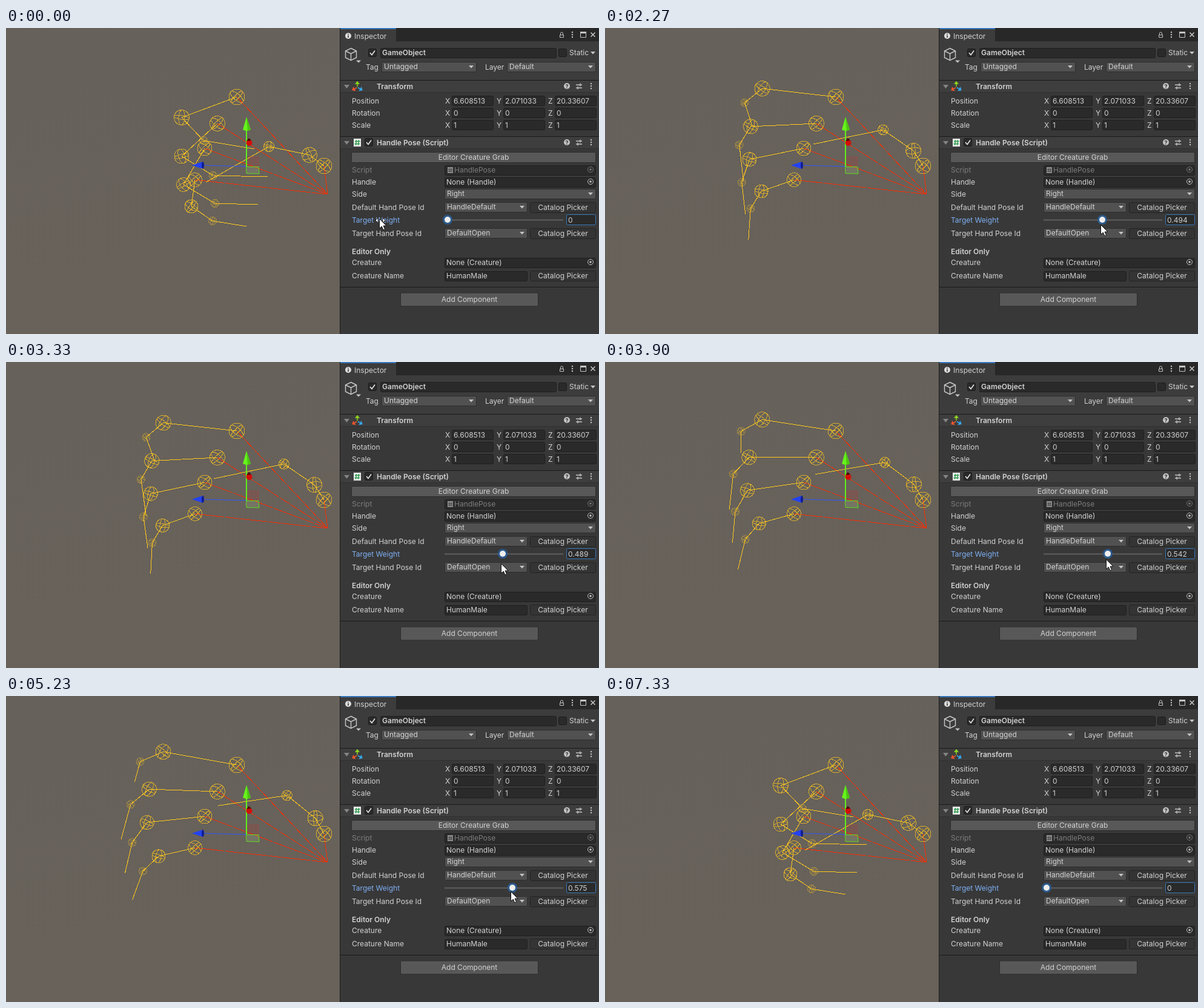
An HTML page that plays this animation: 979x506 px, repeating every 7510 ms.

```html
<!DOCTYPE html>
<html lang="en">
<head>
<meta charset="utf-8">
<title>Hand pose weight</title>
<style>
html, body { margin: 0; width: 100%; height: 100%; overflow: hidden; background: #383838; }
svg { display: block; width: 979px; height: 506px; }
text { font: 12px Inter, "Liberation Sans", sans-serif; fill: #d2d2d2; white-space: pre; }
.bold { font-weight: 600; }
.dim { fill: #7d7d7d; }
.wire { fill: none; stroke: #ffc81e; stroke-width: 1; shape-rendering: crispEdges; }
</style>
</head>
<body>
<svg id="stage" viewBox="0 0 979 506" xmlns="http://www.w3.org/2000/svg">
  <defs>
    <linearGradient id="sky" x2=".25" y2="1">
      <stop stop-color="#66615b"/><stop offset="1" stop-color="#68625a"/>
    </linearGradient>
  </defs>
  <rect width="552" height="506" fill="url(#sky)"/>
  <g class="wire">
    <path id="rays" stroke="#ff2d00" stroke-dasharray="48 2 21 1"/>
    <path id="far" stroke-opacity=".38"/>
    <path id="balls" stroke-opacity=".72"/>
    <path id="bones"/>
  </g>
  <g id="gizmo">
    <rect x="399" y="213" width="18" height="16" fill="#d22" fill-opacity=".14" stroke="#c33" stroke-opacity=".3"/>
    <path d="M396.500 229.500L417 229.500L418 241L397 240.500Z" fill="#8c9a78" fill-opacity=".35" stroke="#5fe01c"/>
    <path d="M397 229L326 227" stroke="#2f55ff"/>
    <path d="M307 227L325 221V233Z" fill="#2342f0"/>
    <ellipse cx="325" cy="227" rx="2" ry="6" fill="#101d90"/>
    <path d="M397 229V168" stroke="#61f01a" stroke-width="2"/>
    <path d="M397 147L391 168Q397 172 404 168Z" fill="#66f21c"/>
    <path d="M397 147L399 170Q402 170 404 168Z" fill="#4cc412"/>
    <circle cx="401.500" cy="190" r="5" fill="#d30f08"/>
    <path d="M397 187L401 182L405 186Z" fill="#4b0805"/>
  </g>
  <g id="panel"></g>
  <path d="M724 317.500H920" stroke="#5e5e5e" stroke-width="2"/>
  <g id="knob"><circle r="8" fill="#2c5a8c"/><circle r="5" fill="#eee"/></g>
  <text id="value" x="928" y="322"></text>
  <g id="cursor">
    <path id="drag" d="M-6 3l4 -4v8zM10 3l-4 -4v8z" fill="#fff" stroke="#111" stroke-width=".8"/>
    <path d="M.5 .5V16.500L4.300 13L6.900 18.800L9.500 17.700L7 12H12Z" fill="#fff" stroke="#111"/>
  </g>
</svg>
<script>
const $ = id => document.getElementById(id);

// ---- Inspector panel ----
const LEFT = 571, FIELD = 724, FULL = 250, SHORT = 137;
const out = [];
const add = s => out.push(s);
const text = (x, y, s, attr = '') => add(`<text x="${x}" y="${y}" ${attr}>${s}</text>`);
const fill = (x, y, w, h, c) => add(`<rect x="${x}" y="${y}" width="${w}" height="${h}" fill="${c}"/>`);
const line = (d, c = '#c4c4c4', w = 1) => add(`<path d="${d}" fill="none" stroke="${c}" stroke-width="${w}"/>`);
const shape = (d, c = '#c4c4c4') => add(`<path d="${d}" fill="${c}"/>`);
const ring = (x, y, r, c = '#c4c4c4') => add(`<circle cx="${x}" cy="${y}" r="${r}" fill="none" stroke="${c}"/>`);
const dot = (x, y, r, c = '#c4c4c4') => add(`<circle cx="${x}" cy="${y}" r="${r}" fill="${c}"/>`);
const box = (x, y, w, h, bg, edge) =>
  add(`<rect x="${x + .5}" y="${y + .5}" width="${w - 1}" height="${h - 1}" rx="2" fill="${bg}" stroke="${edge}"/>`);
const caret = (x, y) => shape(`M${x - 4} ${y - 2}h8l-4 4.500z`);
const dots = (x, y) => [-4, 0, 4].forEach(d => dot(x, y + d, 1.2));
const label = (cy, s, attr) => text(LEFT, cy + 4, s, attr);

function field(x, cy, w, s = '', attr = '', pad = 3) {
  box(x, cy - 8, w, 17, '#2a2a2a', '#1f1f1f');
  text(x + pad, cy + 4, s, attr);
}
function button(x, cy, w, s, h = 18, bg = '#585858', edge = '#2c2c2c') {
  box(x, cy - h / 2, w, h, bg, edge);
  text(x + w / 2, cy + 4, s, 'text-anchor="middle"');
}
const picker = cy => button(865, cy, 109, 'Catalog Picker', 18, '#343434', '#242424');
function dropdown(x, cy, w, s) {
  box(x, cy - 8, w, 17, '#515151', '#2e2e2e');
  text(x + 4, cy + 4, s);
  caret(x + w - 9, cy);
}
function check(x, y, on) {
  box(x, y, 14, 14, '#2a2a2a', '#1b1b1b');
  if (on) line(`M${x + 3} ${y + 7}l3 3.500l5 -7`, '#e6e6e6', 1.6);
}
function target(cy, c) {
  ring(965, cy, 4.5, c);
  dot(965, cy, 1.8, c);
}
function header(y, s) {
  fill(552, y, 427, 20, '#3e3e3e');
  fill(552, y - 1, 427, 1, '#1a1a1a');
  fill(552, y + 19, 427, 1, '#303030');
  shape(`M558 ${y + 7}h9l-4.500 6z`, '#858585');
  text(612, y + 14, s, 'class="bold"');
  dot(926, y + 9, 5);
  text(926, y + 12.5, '?', 'text-anchor="middle" style="font-size:9px;font-weight:700;fill:#333"');
  line(`M941 ${y + 7}h10M941 ${y + 12}h10M948 ${y + 4.5}v5M944 ${y + 9.5}v5`, '#c4c4c4', 1.3);
  dots(966, y + 9);
}

// Tab bar
fill(551, 0, 428, 506, '#383838');
fill(551, 0, 428, 22, '#282828');
fill(552, 0, 92, 22, '#3c3c3c');
fill(552, 0, 92, 2, '#3a79bb');
fill(552, 22, 427, 64, '#3c3c3c');
fill(551, 0, 1, 506, '#1d1d1d');
dot(565, 13, 5, '#ddd');
line('M565 9.500v1.500M565 12v4', '#333', 1.5);
text(575, 18, 'Inspector');
line('M914.500 11.500h6v4h-6zM915.500 11V9a2 2 0 0 1 4 0V11');
dots(935, 11);
line('M948.500 7v8.500h9V7');
fill(948, 6, 10, 3, '#c4c4c4');
line('M965.500 7.500l7 7M972.500 7.500l-7 7', '#c4c4c4', 1.6);

// Object
line('M569.500 33.500l9 4.500v11l-9 4.500l-9 -4.500v-11zM560.500 38l9 4.500l9 -4.500M569.500 42.500v11', '#c9c9c9', 1.4);
shape('M578 53.500h8l-4 4z');
check(598, 34, true);
field(618, 41, 291, 'GameObject', 'class="bold"');
check(912, 34, false);
text(930, 45, 'Static');
caret(969, 41);
text(594, 69, 'Tag');
dropdown(620, 64, 157, 'Untagged');
text(791, 69, 'Layer');
dropdown(827, 64, 147, 'Default');

// Transform
header(87, 'Transform');
['#8fd61f', '#35a9f0', '#f0562d'].forEach((c, i) =>
  add(`<path d="M580 97v-5h-2.500l2.500 -3l2.500 3h-2.500" transform="rotate(${i * 120} 580 98)" fill="${c}" stroke="${c}" stroke-width="1.500"/>`));
[
  ['Position', '6.608513', '2.071033', '20.33607'],
  ['Rotation', 0, 0, 0],
  ['Scale', 1, 1, 1]
].forEach(([name, ...v], row) => {
  const cy = 120 + row * 20;
  text(LEFT, cy + 5, name);
  v.forEach((s, i) => {
    text(725 + i * 85, cy + 5, 'XYZ'[i]);
    field(736 + i * 85, cy, 69);
    text(739 + i * 85, cy + 5, s);
  });
});

// Script
header(180, 'Handle Pose (Script)');
fill(574, 183, 12, 13, '#eee');
line('M578.500 185l-1 9M582.500 185l-1 9M576 187.500h8.500M575.500 191.500h8.500', '#2d9a4b', 1.4);
check(592, 182, true);
button(570, 214, 404, 'Editor Creature Grab');
label(235, 'Script', 'class="dim"');
field(FIELD, 235, FULL, 'HandlePose', 'class="dim"', 16);
fill(729, 230, 9, 10, '#8a8a8a');
line('M732 232v6M735 232v6M730 234h7M730 237h7', '#444');
target(234, '#777');
label(255, 'Handle');
field(FIELD, 255, FULL, 'None (Handle)');
target(254);
label(275, 'Side');
dropdown(FIELD, 274, FULL, 'Right');
label(297, 'Default Hand Pose Id');
dropdown(FIELD, 296, SHORT, 'HandleDefault');
picker(297);
label(318, 'Target Weight', 'style="fill:#7fb0f5"');
box(925, 308, 49, 18, '#2a2a2a', '#3a79bb');
label(340, 'Target Hand Pose Id');
dropdown(FIELD, 339, SHORT, 'DefaultOpen');
picker(340);
label(370, 'Editor Only', 'class="bold"');
label(388, 'Creature');
field(FIELD, 388, FULL, 'None (Creature)');
target(387);
label(410, 'Creature Name');
field(FIELD, 410, SHORT, 'HumanMale');
picker(410);
fill(552, 428, 427, 1, '#1a1a1a');
button(651, 449, 228, 'Add Component', 23);
$('panel').innerHTML = out.join('');

// ---- Hand: each bone turns in space from a closed to an open direction ----
const OPEN_AT = .752, WRIST = [531, 275];
const TURN = [1, 1.9, 2.35], THUMB_TURN = [.4, .5, .8];
const fingers = [
  { base: [381, 114], closed: [[-91, 34], [36, 38], [84, 14]], open: [[-117, -38], [-52, -1], [-52, 17]] },
  { base: [349, 158], closed: [[-59, 54], [52, 32], [90, 2]], open: [[-117, -23], [-52, 10], [-60, 41]] },
  { base: [328, 199], closed: [[-35, 60], [52, 31], [71, 2]], open: [[-104, -8], [-46, 18], [-47, 36]] },
  { base: [312, 251], closed: [[-6, 44], [35, 24], [56, 9]], open: [[-71, 2], [-40, 13], [-43, 30]] },
  { base: [525, 228], closed: [[-24, -18], [-67, -14], [-104, 59]], open: [[-11, -28], [-39, -44], [-109, 2]], thumb: true }
];

// Spherical blend of two directions that lie `turn` radians apart
function swing(a, b, turn, u) {
  const p = Math.sin(turn * (1 - u)) / Math.sin(turn), q = Math.sin(turn * u) / Math.sin(turn);
  return [a[0] * p + b[0] * q, a[1] * p + b[1] * q];
}
function joints({ base, closed, open, thumb }, w) {
  const pts = [base];
  closed.forEach((c, i) => {
    const [dx, dy] = swing(c, open[i], (thumb ? THUMB_TURN : TURN)[i], w / OPEN_AT);
    pts.push([pts[i][0] + dx, pts[i][1] + dy]);
  });
  return pts;
}
function ellipse([x, y], rx, ry, deg) {
  const a = deg * Math.PI / 180, dx = rx * Math.cos(a), dy = rx * Math.sin(a);
  const f = n => n.toFixed(1);
  const arc = `A${f(rx)} ${f(ry)} ${f(deg)} 1 1 `;
  return `M${f(x - dx)} ${f(y - dy)}${arc}${f(x + dx)} ${f(y + dy)}${arc}${f(x - dx)} ${f(y - dy)}`;
}
const ball = (p, r, deg) =>
  ellipse(p, r, r, 0) + ellipse(p, r, r * .25, deg) + ellipse(p, r, r * .4, deg + 85);
const angle = (a, b) => Math.atan2(b[1] - a[1], b[0] - a[0]) * 180 / Math.PI;

$('rays').setAttribute('d', fingers.map(f => `M${f.base}L${WRIST}`).join(''));

function drawHand(w) {
  let bones = '', balls = '', far = '';
  fingers.forEach((finger, i) => {
    const [base, a, b, c] = joints(finger, w);
    const r = finger.thumb ? 13 : 13 - i / 2;
    bones += `M${base}L${a}L${b}L${c}`;
    balls += ball(base, r, -45) + ball(a, r - .5, angle(base, a) + 30);
    if (finger.thumb) {
      balls += ball(b, 8.5, angle(a, b));
      if (w > .6) far += ball(c, 6, angle(b, c));
    } else far += ball(b, 6.5, angle(a, b));
  });
  $('bones').setAttribute('d', bones);
  $('balls').setAttribute('d', balls);
  $('far').setAttribute('d', far);
}

// ---- Timeline: eased tracks of [time, value] ----
const LOOP = 7510, STEP = .00537, KNOB_X = 729;
const weight = [[1290, 0], [1430, .02], [1570, .02], [2870, .87], [3130, .87], [3480, .242], [3700, .36],
  [4230, .93], [4400, .93], [4620, .19], [5130, .5], [5550, 1], [6366, 0]];
const reach = [[670, -110], [1330, 3], [2270, 0], [6300, 0], [6630, -36], [6700, -36], [6800, -20]];
const height = [[670, 315], [1330, 318], [3330, 333], [4470, 320], [6630, 330], [6700, 330], [6800, 422]];

function track(keys, t) {
  const i = keys.findIndex(k => k[0] > t);
  if (i < 1) return keys[i < 0 ? keys.length - 1 : 0][1];
  const [t0, a] = keys[i - 1], [t1, b] = keys[i];
  const u = (t - t0) / (t1 - t0);
  return a + (b - a) * u * u * (3 - 2 * u);
}

function frame() {
  const t = performance.now() % LOOP;
  const n = Math.round(track(weight, t) / STEP), w = Math.min(1, n * STEP);
  const x = Math.round(KNOB_X - 3 + n + track(reach, t)), y = Math.round(track(height, t));
  drawHand(w);
  $('knob').setAttribute('transform', `translate(${KNOB_X + n} 317)`);
  $('value').textContent = +w.toFixed(3);
  $('cursor').setAttribute('transform', `translate(${x} ${y})`);
  $('cursor').style.display = t < 6800 ? '' : 'none';
  $('drag').style.display = x < 652 ? '' : 'none';
  requestAnimationFrame(frame);
}
frame();
</script>
</body>
</html>
```
